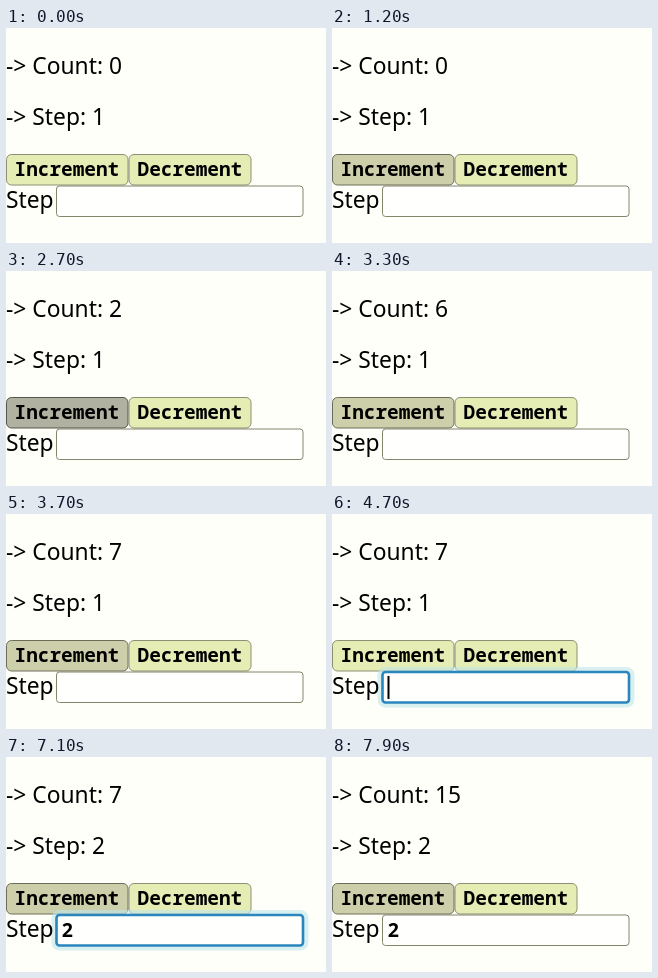
These frames come from a looping animation (320 by 215 pixels, 8 s). An HTML page:

```html
<!DOCTYPE html>
<html lang="en">
<head>
<meta charset="utf-8">
<title>Counter</title>
<style>
  html, body { margin: 0; width: 100%; height: 100%; overflow: hidden; background: #fffffa; }
  svg { display: block; width: 320px; height: 215px; }
  text { font: 500 22.8px "Noto Sans", "Open Sans", sans-serif; fill: #000; }
  .mono { font: 600 19.4px "Noto Sans Mono", "DejaVu Sans Mono", monospace; }
  .button rect { fill: #e6edb4; stroke: #8c8f74; }
  .button.hover rect { fill: #cdceaa; stroke: #6c6d58; }
  .button.active rect { fill: #b0b1a0; stroke: #55564a; }
  .box { fill: #fffffd; stroke: #85856c; }
  .glow { fill: none; stroke: #f1f6e8; stroke-width: 4; visibility: hidden; }
  .hover > .glow { visibility: visible; }
  .focus > .box { stroke: #2b86bd; stroke-width: 2.6; }
  .focus > .glow { stroke: #bfe6ea; stroke-width: 8; stroke-opacity: .6; visibility: visible; }
</style>
</head>
<body>
<svg viewBox="0 0 320 215">
  <text id="count" x="0" y="46"></text>
  <text id="step" x="0" y="97"></text>
  <g id="increment" class="button">
    <rect x=".5" y="126.5" width="121.5" height="30.5" rx="5"/>
    <text class="mono" x="8.5" y="148">Increment</text>
  </g>
  <g id="decrement" class="button">
    <rect x="123" y="126.5" width="122" height="30.5" rx="5"/>
    <text class="mono" x="131.5" y="148">Decrement</text>
  </g>
  <g id="field">
    <rect class="glow" x="49.5" y="157" width="249" height="32.5" rx="4"/>
    <rect class="box" x="50.5" y="158" width="246.5" height="30.5" rx="3"/>
    <text id="value" class="mono" x="55.5" y="180"></text>
    <rect id="caret" y="162" width="2" height="23"/>
  </g>
  <text x="0" y="180">Step</text>
</svg>
<script>
const LOOP = 8000;
const byId = id => document.getElementById(id);
const between = (t, from, to) => t >= from && t < to;
const passed = (times, t) => times.filter(time => t >= time).length;

// Times at which the count rises, by one and, after typing, by two.
const singleClicks = [1900, 2500, 2800, 3000, 3100, 3300, 3600];
const doubleClicks = [7400, 7500, 7700, 7900];
// Spans in which the button is held down.
const presses = [
  [1700, 1900], [2400, 2500], [2700, 2800], [2900, 3000],
  [3100, 3300], [3500, 3600], [7300, 7400], [7700, 7900]
];

function render(t) {
  const typed = t >= 5900;
  const focused = between(t, 4700, 7300);

  byId("count").textContent = "-> Count: " + (passed(singleClicks, t) + 2 * passed(doubleClicks, t));
  byId("step").textContent = "-> Step: " + (typed ? 2 : 1);
  byId("value").textContent = typed ? "2" : "";

  const increment = byId("increment").classList;
  increment.toggle("hover", between(t, 1200, 4500) || t >= 6300);
  increment.toggle("active", presses.some(([from, to]) => between(t, from, to)));
  byId("decrement").classList.toggle("hover", between(t, 300, 700));

  const field = byId("field").classList;
  field.toggle("hover", between(t, 900, 1200) || between(t, 4500, 6300));
  field.toggle("focus", focused);

  const caret = byId("caret");
  caret.setAttribute("x", typed ? 67 : 55.5);
  caret.setAttribute("visibility", focused && t < 7100 ? "visible" : "hidden");
}

const start = performance.now();
function tick() {
  render((performance.now() - start) % LOOP);
  requestAnimationFrame(tick);
}
tick();
</script>
</body>
</html>
```
